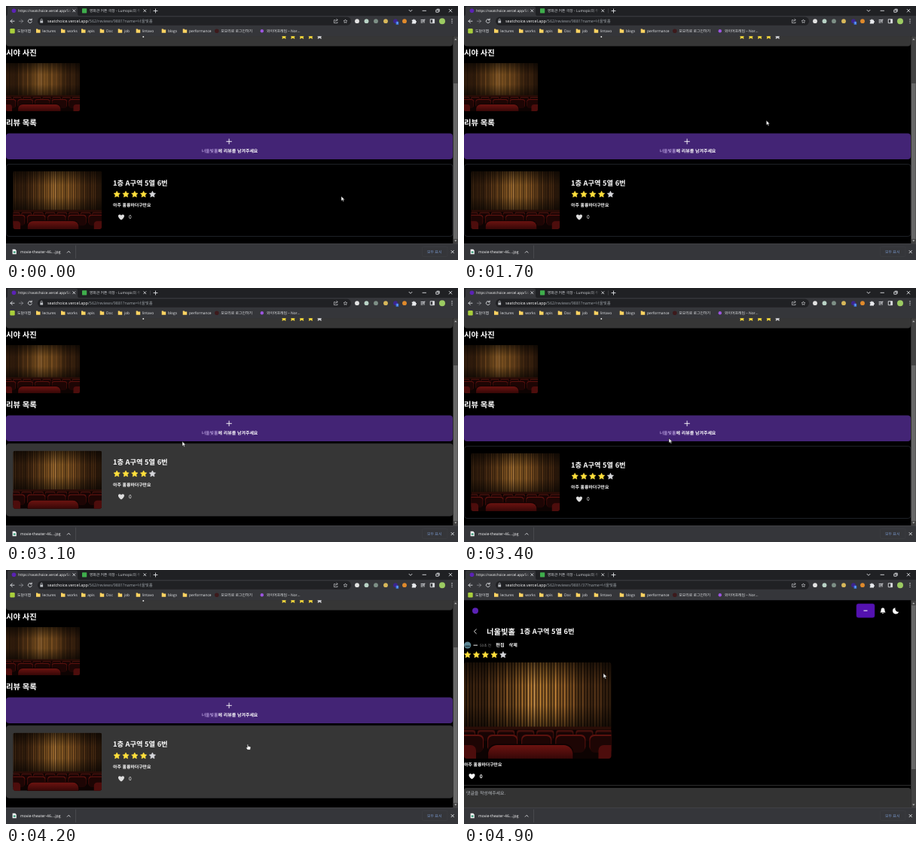
Write an HTML page that moves like this. It is 600 px wide and 338 px high and loops after 5 s.

```html
<!DOCTYPE html>
<html lang="ko">
<head>
<meta charset="utf-8">
<style>
html, body { margin: 0; height: 100%; overflow: hidden; background: #000; }
svg { display: block; width: 100%; height: 100%; }
text { white-space: pre; text-rendering: geometricPrecision; font-family: "Noto Sans CJK KR", "Noto Sans", sans-serif; }
.ui text { font-family: "Open Sans", "Noto Sans CJK KR", sans-serif; }
.line { fill: none; stroke: #dfe1e5; stroke-width: .9; stroke-linecap: round; stroke-linejoin: round; }
</style>
</head>
<body>
<svg id="stage" viewBox="0 0 600 338" preserveAspectRatio="none"></svg>
<script>
const hall = '너울빛홀';
const seat = '1층 A구역 5열 6번';

const text = (x, y, size, str, fill = '#fff', weight = 400, extra = '') =>
  `<text x="${x}" y="${y}" font-size="${size}" fill="${fill}" font-weight="${weight}" ${extra}>${str}</text>`;
const rect = (x, y, w, h, fill, r = 0, extra = '') =>
  `<rect x="${x}" y="${y}" width="${w}" height="${h}" fill="${fill}" rx="${r}" ${extra}/>`;
const dot = (x, y, r, fill) => `<circle cx="${x}" cy="${y}" r="${r}" fill="${fill}"/>`;
const line = (d, extra = '') => `<path class="line" d="${d}" ${extra}/>`;
const photo = (x, y, w, h) => `<use href="#photo" x="${x}" y="${y}" width="${w}" height="${h}"/>`;
const cross = (x, y, r) => line(`M${x - r} ${y - r}l${2 * r} ${2 * r}m0 ${-2 * r}l${-2 * r} ${2 * r}`);

function star(x, y, r, fill, edge = fill) {
  const pts = Array.from({ length: 10 }, (_, i) => {
    const a = i * Math.PI / 5, d = i % 2 ? r * .5 : r;
    return `${(x + d * Math.sin(a)).toFixed(2)},${(y - d * Math.cos(a)).toFixed(2)}`;
  });
  return `<polygon points="${pts.join(' ')}" fill="${fill}" stroke="${edge}" stroke-width=".6" stroke-linejoin="round"/>`;
}
const stars = (x, y, r = 4.4) =>
  [0, 1, 2, 3, 4].map(i => star(x + i * 11.8, y, r, i < 4 ? '#ffe03c' : '#d5d6da')).join('');
const heart = (x, y, fill) =>
  `<path transform="translate(${x} ${y}) scale(.94)" fill="${fill}" d="M0 4C-6 0-4.6-3.8-2.3-3.8Q-.7-3.8 0-2.4Q.7-3.8 2.3-3.8C4.6-3.8 6 0 0 4z"/>`;

// Pleats, brightest under the spotlight in the middle
function curtain() {
  let s = rect(0, 0, 195, 87, '#1c0e05');
  for (let i = 0; i < 49; i++) {
    const x = i * 4, glow = Math.exp(-(((x - 98) / 52) ** 2));
    const light = (17 + 40 * glow) * (.84 + .16 * Math.sin(i * i));
    s += rect(x, 0, 2.6, 87, `hsl(${27 + 7 * glow} 57% ${light}%)`);
    s += rect(x + 2.6, 0, .8, 87, `hsl(27 60% ${light * .42}%)`);
  }
  return s + rect(0, 0, 195, 87, 'url(#shade)');
}

function seats() {
  let s = rect(0, 86, 195, 42, '#0d0302') + rect(0, 85.5, 195, 4, '#2a0d07');
  for (let i = 0; i < 8; i++) s += rect(i * 26 - 8, 90, 23, 12, '#43100c', 3) + rect(i * 26 - 7, 92.5, 21, 12, '#170404', 3);
  for (let i = 0; i < 5; i++) s += rect(i * 45 - 14, 96, 40, 22, '#5b120e', 6) + rect(i * 45 - 13, 98, 38, 22, '#1d0504', 6);
  for (const x of [-24, 178]) s += rect(x, 110, 40, 30, '#4d0d0c', 7);
  return s + rect(31, 108.5, 114, 40, '#0d0202', 12) + rect(32, 110, 112, 40, 'url(#plush)', 12);
}

const defs = `<defs>
<linearGradient id="shade" x2="0" y2="1">
  <stop stop-opacity=".6"/><stop offset=".35" stop-opacity=".1"/>
  <stop offset=".65" stop-opacity=".1"/><stop offset="1" stop-opacity=".6"/>
</linearGradient>
<linearGradient id="plush" x2="0" y2="1"><stop stop-color="#6b1310"/><stop offset=".5" stop-color="#300606"/></linearGradient>
<linearGradient id="fade1"><stop stop-color="#35363a" stop-opacity="0"/><stop offset="1" stop-color="#35363a"/></linearGradient>
<linearGradient id="fade2"><stop stop-color="#202124" stop-opacity="0"/><stop offset="1" stop-color="#202124"/></linearGradient>
<clipPath id="round">${rect(0, 0, 195, 128, '#000', 4)}</clipPath>
<clipPath id="view">${rect(0, 40, 594, 276, '#000')}</clipPath>
<symbol id="photo" viewBox="0 0 195 128" preserveAspectRatio="none">
  <g clip-path="url(#round)">${curtain()}${seats()}</g></symbol>
</defs>`;

const listPage = `<g id="list" clip-path="url(#view)">
${rect(0, 30, 593, 23.5, '#363636', 4)}${stars(369, 40.5, 3.6)}${rect(181.5, 40, 1.6, 1.8, '#fff')}
${text(0, 65.5, 10.3, '시야 사진', '#fff', 700)}${photo(0, 76, 98, 64)}
${text(0, 158.5, 10.3, '리뷰 목록', '#fff', 700)}
${rect(0, 169.5, 593, 34.5, '#432475', 4)}${line('M292.8 180.3h6.6m-3.3-3.3v6.6', 'style="stroke:#fff"')}
${text(297, 195.3, 5.97, `<tspan fill="#dcc4ff" font-weight="400">${hall}</tspan>에 리뷰를 남겨주세요`, '#fff', 700, 'text-anchor="middle"')}
<g id="card">
  <rect id="cardBg" x=".5" y="210.5" width="592.5" height="96" rx="3.5" stroke-width=".8"/>
  ${photo(9.5, 220, 117.5, 77)}
  ${text(142, 238.7, 9.25, seat, '#fff', 700)}${stars(147.2, 250.7)}
  ${text(142, 267.3, 5.9, '아주 훌륭하더구만요', '#fff', 700)}
  ${heart(153, 281, '#dedede')}${text(163, 283.3, 6.5, '0', '#fff', 500)}
</g></g>`;

const reviewPage = `<g id="review" clip-path="url(#view)">
${dot(15, 54.2, 4, '#5b22b5')}
${rect(521, 45, 24, 18.2, '#5412b0', 2.5, 'stroke="#48109a" stroke-width=".6"')}${rect(530.5, 53.6, 5, 1, '#fff')}
<path fill="#fff" d="M552.4 56.6Q553.6 55.6 553.6 53Q553.6 50.4 556 50.2Q558.4 50.4 558.4 53Q558.4 55.6 559.6 56.6zM554.8 57.3h2.4q-1.2 1.8-2.4 0z"/>
<path fill="#fff" d="M572.6 50.2A4.2 4.2 0 1 0 577.2 55.6A4.1 4.1 0 0 1 572.6 50.2z"/>
${line('M16.3 79l-2.9 2.8l2.9 2.8', 'style="stroke:#fff"')}
${text(30, 85.5, 10.3, hall, '#fff', 700)}${text(74.3, 85.2, 9.2, seat, '#fff', 700)}
${dot(4.7, 100, 4.6, '#5d8795')}${rect(1.3, 100.4, 6.8, 2.2, '#2b4650', 1)}${rect(12.5, 99.6, 5.5, 1, '#eee')}
${text(21, 101.8, 4.7, '50초 전', '#8a8a8a')}
${text(42.3, 102.3, 6.1, '편집', '#fff', 700)}${text(59.6, 102.3, 6.1, '삭제', '#fff', 700)}
${stars(4.7, 113)}
<g id="body">
  ${photo(0, 123, 195.5, 128)}
  ${text(0, 261.2, 5.9, '아주 훌륭하더구만요', '#fff', 700)}
  ${heart(10.5, 274.5, '#fff')}${text(20.8, 277, 6.5, '0', '#fff', 700)}
  ${rect(0, 286, 593, .9, '#333')}
  ${rect(0, 290, 593, 40, '#333', 3)}${text(3, 299.3, 5.9, '댓글을 작성해주세요.', '#b8bcc2')}
</g></g>`;

const folders = [[40, 'lectures'], [73, 'works'], [100, 'apis'], [124.7, 'Doc'], [148.7, 'job'],
  [172.7, 'lintavo'], [206.7, 'blogs'], [234.7, 'performance']];
const folder = ([x, name]) =>
  `<path fill="#fcd462" d="M${x} 30.6h2l.7.8h2.8v4.4h-5.5z"/>` + text(x + 8.2, 35.1, 4.9, name, '#e8eaed');
const badges = [[466, '#e3e3e3'], [478.5, '#b9d3c6'], [491, '#7d8f86'], [504, '#d8b85a'], [517, '#3c258f'], [529, '#e08a2c']];

const chrome = `<g class="ui">
${rect(0, 0, 600, 14, '#202124')}
<path fill="#35363a" d="M0 13.5Q2 13 2 10V3Q2 .8 4 .8H93Q95 .8 95 3V10Q95 13 97 13.5z"/>
${rect(0, 13, 600, 27.2, '#35363a')}
${dot(10.5, 6.3, 2.8, '#5b22b5')}${text(16.3, 8.2, 4.7, 'https://seatchoice.vercel.app/56', '#fff')}
${rect(80, 1.5, 7, 10, 'url(#fade1)')}${rect(87, 1.5, 3, 10, '#35363a')}${cross(90.3, 6.3, 1.5)}
${rect(101, 3.2, 6.2, 6.2, '#3fae4c', .6)}${text(110.8, 8.2, 4.9, '영화관 커튼 극장 - Lumopic의 무', '#d5d8dc')}
${rect(171, 1, 8, 11, 'url(#fade2)')}${rect(179, 1, 11, 11, '#202124')}${cross(184.3, 6.3, 1.5)}
${rect(191.3, 3.5, .5, 6, '#55575b')}${line('M196 6.5h5m-2.5-2.5v5')}
${line('M535 5.3l2 2l2-2M553 6.3h4.5M571.2 5.2h3v3h-3zm1-1h3v3')}${cross(590, 6.2, 1.8)}
${line('M11 20.2h-5m2.3-2.3l-2.3 2.3l2.3 2.3')}
${line('M17.5 20.2h5m-2.3-2.3l2.3 2.3l-2.3 2.3', 'opacity=".45"')}
${line('M33.8 18.4a2.5 2.5 0 1 0 .5 2.5M34.2 17v1.8h-1.8')}
${rect(42, 14.6, 416, 11.2, '#202124', 5.6)}
${rect(45.3, 19.4, 3.8, 3.2, '#bdc1c6', .4)}${line('M46.1 19.3v-1a1.1 1.1 0 0 1 2.2 0v1', 'style="stroke-width:.6"')}
${text(55, 22.1, 5.4, 'seatchoice.vercel.app<tspan id="path" fill="#9aa0a6"></tspan>', '#fff')}
${line('M437 18.6h-1.6v4h4.6v-1.2M437 20.8q.3-2.2 3-2.3m-1.2-1.2l1.4 1.2l-1.4 1.2', 'style="stroke-width:.6"')}
${star(450.5, 20.4, 2.5, 'none', '#dfe1e5')}
${badges.map(([x, c]) => dot(x, 20.2, 2.9, c)).join('')}
${rect(517.6, 20.8, 3.6, 4, '#3b78e7', .6)}${text(518.5, 24.2, 3.6, '1', '#fff')}
<path fill="#e8eaed" d="M538.8 18.4h1.6a1 1 0 0 1 2 0h1.6v1.6a1 1 0 0 1 0 2v1.6h-5.2v-1.7a1 1 0 0 0 0-1.9z"/>
${line('M551 18.4h3.5M551 20.2h3.5M551 22h2M555 22.2v-4h1')}
${line('M563.6 17.7h5v5h-5z')}${rect(566.2, 17.7, 2.4, 5, '#dfe1e5')}
${dot(579, 20.2, 4, '#9ccb62')}
${[17.8, 20.2, 22.6].map(y => dot(592, y, .7, '#dfe1e5')).join('')}
${rect(5.3, 30, 6.4, 6.4, '#a9cf3c', 1.2)}${text(15, 35.1, 4.9, '도담이맵', '#e8eaed')}
${folders.map(folder).join('')}
${dot(279.8, 33.2, 2.8, '#3d1a1c')}${text(285.2, 35.1, 4.9, '모모리로 로그인하기', '#e8eaed')}
${dot(339.8, 33.2, 2.2, '#9c55e0')}${text(346, 35.1, 4.9, '와이어프레임 – Nor...', '#e8eaed')}
${rect(593.3, 40.2, 6.7, 276, '#424242')}<rect id="thumb" x="594" width="5.5" fill="#686868"/>
<path fill="#bbb" d="M595.2 45.2l1.6-2l1.6 2zM595.2 311.6l1.6 2l1.6-2z"/>
${rect(0, 316, 600, 22, '#35363a')}${rect(0, 316, 600, .5, '#4a4b4f')}
<path fill="#f1f3f4" d="M8.6 323.8h3.6l1.6 1.6v4.8h-5.2z"/>${rect(9.8, 326.4, 2.8, 2.4, '#3c9d7a')}
${text(19, 329.2, 5.1, 'movie-theater-46....jpg', '#fff')}
${line('M81.3 328.2l1.9-1.9l1.9 1.9')}${rect(92, 318.5, .6, 17.5, '#55575b')}
${rect(552.5, 320.3, 33.5, 13.2, 'none', 2, 'stroke="#3e4044" stroke-width=".6"')}
${text(559, 329, 4.95, '모두 표시', '#7795c8')}${cross(592.7, 327.1, 1.7)}
</g>`;

const pointer = `<g id="cursor" stroke="#111" stroke-width=".5" stroke-linejoin="round" fill="#fff">
<path id="arrow" d="M0 0v6.2l1.5-1.3l1 2.2l1.1-.5l-1-2.1h2z"/>
<path id="hand" d="M-.7 0q.8-.7 1.4 0v2.3l2.6.5q.8.2.7 1.2l-.5 3.2h-3.8l-2-2.7q0-1.1 1.6-.3z"/></g>`;

const stage = document.getElementById('stage');
stage.innerHTML = defs + rect(0, 0, 600, 338, '#000') + listPage + reviewPage + chrome + pointer;
const $ = id => document.getElementById(id);
const show = (id, on) => $(id).setAttribute('display', on ? 'inline' : 'none');
const set = (id, attrs) => { for (const k in attrs) $(id).setAttribute(k, attrs[k]); };

// Pointer stops: time, x, y
const stops = [[0, 445, 253.2], [700, 436, 228], [1700, 401.3, 152.3], [2200, 235, 178], [2600, 138, 214],
  [2850, 180, 226], [3100, 234, 204.3], [3400, 272, 200], [3800, 305, 241], [4150, 318, 236],
  [4400, 323, 206.5], [4900, 185, 137.6], [5000, 176, 134]];

function pointerAt(t) {
  let i = 0;
  while (t >= stops[i + 1][0]) i++;
  const [a, b] = [stops[i], stops[i + 1]];
  const u = (t - a[0]) / (b[0] - a[0]);
  const slope = (k, n) => {
    const p = stops[Math.max(k - 1, 0)], q = stops[Math.min(k + 1, stops.length - 1)];
    return (q[n] - p[n]) / (q[0] - p[0]) * (b[0] - a[0]);
  };
  return [1, 2].map(n => {
    const m = slope(i, n), k = slope(i + 1, n), d = b[n] - a[n];
    return a[n] + u * (m + u * (3 * d - 2 * m - k + u * (m + k - 2 * d)));
  });
}

const ease = (t, start, span) => {
  const u = Math.min(1, Math.max(0, (t - start) / span));
  return u * u * (3 - 2 * u);
};

function draw(now) {
  const t = Math.floor(now % 5000 / 100) * 100;
  const opened = t >= 4300, loaded = t >= 4600;
  const hover = ease(t, 2610, 300) - ease(t, 3100, 300) + ease(t, 3660, 250);
  const over = (t > 2600 && t < 3100) || (t > 3600 && !opened);

  show('list', !opened);
  show('review', opened);
  show('body', loaded);
  $('path').textContent = `/562/reviews/9881${opened ? '/37' : ''}?name=${hall}`;
  set('thumb', opened ? { y: 47, height: loaded ? 218 : 181 } : { y: 103, height: 207 });

  const mix = (a, b) => Math.round(a + (b - a) * hover);
  set('card', { transform: `translate(0 ${-3.3 * hover})` });
  set('cardBg', {
    fill: `rgb(${mix(0, 54)},${mix(0, 54)},${mix(0, 54)})`,
    stroke: `rgb(${mix(38, 58)},${mix(42, 58)},${mix(50, 60)})`
  });

  const [x, y] = pointerAt(t);
  set('cursor', { transform: `translate(${x} ${y})` });
  show('arrow', !over);
  show('hand', over);
  requestAnimationFrame(tick);
}
const tick = () => draw(performance.now());
tick();
</script>
</body>
</html>
```
